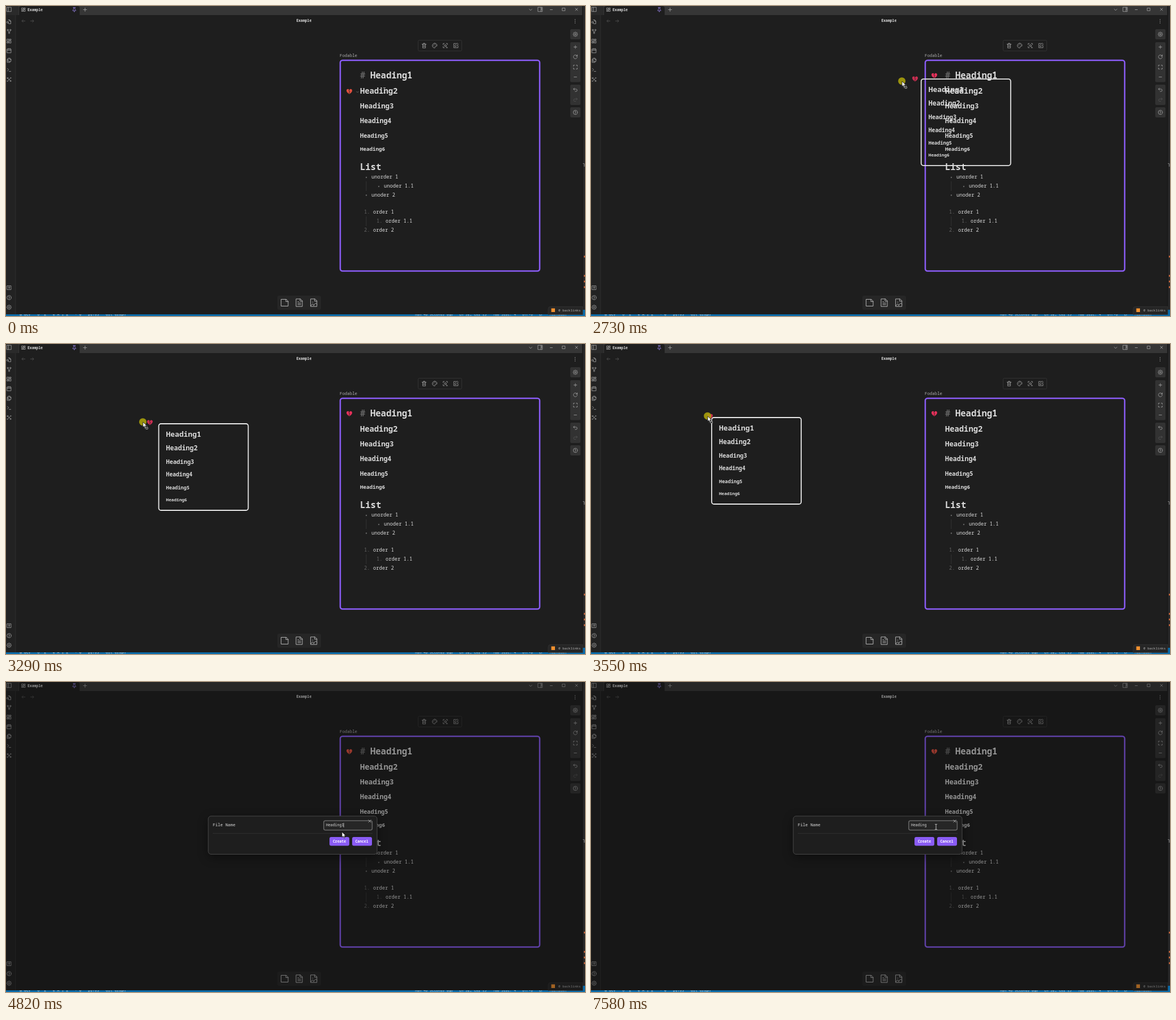
Animation, 1022 px wide and 548 px high, one loop 7990 ms. Source, as an HTML page with a canvas:

```html
<!DOCTYPE html>
<html lang="en">
<head>
<meta charset="utf-8">
<title>Canvas drag demo</title>
<style>
html, body { margin: 0; width: 100%; height: 100%; overflow: hidden; background: #1e1e1e; }
canvas { display: block; width: 1022px; height: 548px; }
</style>
</head>
<body>
<canvas id="stage" width="1022" height="548"></canvas>
<script>
const ctx = document.getElementById('stage').getContext('2d');
const LOOP = 7990, PRESS = 2460, DRAG = 2620, DROP = 3680;
const MONO = '"Noto Sans Mono", "DejaVu Sans Mono", monospace';
const BG = '#1e1e1e', PANEL = '#262626', ICON = '#a6a6a6', TEXT = '#dadada', PURPLE = '#8a5cf5';

// Outlines on a 24 unit grid
const ICONS = {
  panelLeft: 'M3 3H21V21H3Z M9 3V21',
  panelRight: 'M3 3H21V21H3Z M15 3V21 M18 7V9 M18 12V14',
  board: 'M3 3H10V12H3Z M14 3H21V8H14Z M14 12H21V21H14Z M3 16H10V21H3Z',
  pin: 'M12 17V23 M7 2H17 M9 2V10L5 14V17H19V14L15 10V2',
  plus: 'M12 4V20 M4 12H20',
  minus: 'M5 12H19',
  close: 'M5 5L19 19 M19 5L5 19',
  square: 'M4 4H20V20H4Z',
  down: 'M5 9L12 16L19 9',
  left: 'M20 12H4 M10 5L3 12L10 19',
  right: 'M4 12H20 M14 5L21 12L14 19',
  search: 'M8 3H15L20 8V21H11 M14 3V9H20 M9 14A4 4 0 1 1 1 14A4 4 0 1 1 9 14 M8 17L11 21',
  fork: 'M9 5A3 3 0 1 1 3 5A3 3 0 1 1 9 5 M21 5A3 3 0 1 1 15 5A3 3 0 1 1 21 5 M15 19A3 3 0 1 1 9 19A3 3 0 1 1 15 19 M6 8L11 16 M18 8L13 16',
  calendar: 'M3 4H21V22H3Z M3 10H21 M8 1V6 M16 1V6',
  copy: 'M8 2H16L21 7V17H8Z M15 2V8H21 M8 7H3V22H16V17',
  terminal: 'M4 17L10 11L4 5 M12 19H20',
  tools: 'M4 4L20 20 M20 4L4 20 M2 6L6 2 M18 2L22 6 M2 18L6 22 M18 22L22 18 M8 4L4 8 M16 20L20 16',
  vault: 'M3 3H21V21H3Z M15 10A3 3 0 1 1 9 10A3 3 0 1 1 15 10 M12 13V17',
  help: 'M22 12A10 10 0 1 1 2 12A10 10 0 1 1 22 12 M9 9A3 3 0 1 1 12 13V14 M12 17V18',
  trash: 'M3 6H21 M6 6V22H18V6 M9 6V2H15V6 M10 11V17 M14 11V17',
  palette: 'M12 2A10 10 0 1 0 12 22C15 22 12 18 14 16C17 14 22 17 22 11C22 6 17 2 12 2 M7 12V13 M9 7V8 M14 6V7 M18 10V11',
  zoom: 'M3 8V3H8 M16 3H21V8 M3 16V21H8 M16 21H21 M16 12A4 4 0 1 1 8 12A4 4 0 1 1 16 12 M15 15L20 20',
  edit: 'M12 3H3V21H21V12 M18 2L22 6L12 16H8V12Z',
  rotate: 'M21 12A9 9 0 1 1 18 5L21 8 M21 2V8H15',
  expand: 'M3 8V3H8 M16 3H21V8 M3 16V21H8 M16 21H21V16',
  undo: 'M8 4L3 9L8 14 M3 9H15A5 5 0 0 1 15 20H11',
  redo: 'M16 4L21 9L16 14 M21 9H9A5 5 0 0 0 9 20H13',
  note: 'M3 3H16L21 8V21H3Z M15 3V9H21',
  file: 'M4 2H15L20 7V22H4Z M14 2V8H20 M8 9H10 M8 13H16 M8 17H16',
  image: 'M4 2H15L20 7V22H4Z M14 2V8H20 M4 20L9 15L13 19 M10 20L17 13L20 16 M9 10V11'
};
for (const name in ICONS) ICONS[name] = new Path2D(ICONS[name]);

function icon(name, x, y, size = 9, color = ICON, weight = 0.8) {
  ctx.save();
  ctx.translate(x - size / 2, y - size / 2);
  ctx.scale(size / 24, size / 24);
  ctx.strokeStyle = color;
  ctx.lineWidth = weight * 24 / size;
  ctx.lineJoin = ctx.lineCap = 'round';
  ctx.stroke(ICONS[name]);
  ctx.restore();
}

function gear(x, y) {
  ctx.strokeStyle = ICON;
  ctx.lineWidth = 0.8;
  ctx.beginPath();
  for (let i = 0; i <= 64; i++) {
    const a = i / 64 * Math.PI * 2, r = 3.5 + 0.55 * Math.tanh(4 * Math.cos(8 * a));
    ctx.lineTo(x + r * Math.cos(a), y + r * Math.sin(a));
  }
  ctx.stroke();
  circle(x, y, 1.3);
  ctx.stroke();
}

function circle(x, y, r, fill) {
  ctx.beginPath();
  ctx.arc(x, y, r, 0, Math.PI * 2);
  if (fill) { ctx.fillStyle = fill; ctx.fill(); }
}

function rect(x, y, w, h, fill) {
  ctx.fillStyle = fill;
  ctx.fillRect(x, y, w, h);
}

function box(x, y, w, h, r, fill, stroke, line = 1) {
  ctx.beginPath();
  ctx.roundRect(x, y, w, h, r);
  if (fill) { ctx.fillStyle = fill; ctx.fill(); }
  if (stroke) { ctx.strokeStyle = stroke; ctx.lineWidth = line; ctx.stroke(); }
}

// y is the middle of the capitals
function text(str, x, y, size, color = TEXT, bold = false) {
  ctx.font = (bold ? 'bold ' : '') + size + 'px ' + MONO;
  ctx.fillStyle = color;
  ctx.fillText(str, x, y + size * 0.36);
}

function heart(x, y, color) {
  ctx.save();
  ctx.translate(x, y);
  ctx.fillStyle = color;
  ctx.beginPath();
  ctx.moveTo(0, 4.8);
  ctx.bezierCurveTo(-3, 2.6, -5, 0.8, -5, -1.6);
  ctx.bezierCurveTo(-5, -5, -1, -5, 0, -2.4);
  ctx.bezierCurveTo(1, -5, 5, -5, 5, -1.6);
  ctx.bezierCurveTo(5, 0.8, 3, 2.6, 0, 4.8);
  ctx.fill();
  ctx.strokeStyle = BG;
  ctx.lineWidth = 0.9;
  ctx.stroke(new Path2D('M.3 -3.4L-.9 -1.2L1 .2L-.4 2L.2 4'));
  ctx.restore();
}

const arrowPath = new Path2D('M0 0V9.4L2.2 7.4L3.8 10.8L5.4 10.1L3.9 6.8H6.8Z');
function arrow(x, y) {
  ctx.save();
  ctx.translate(x, y);
  ctx.lineWidth = 0.8;
  ctx.strokeStyle = '#111';
  ctx.fillStyle = '#fff';
  ctx.fill(arrowPath);
  ctx.stroke(arrowPath);
  ctx.restore();
}

function beam(x, y) {
  ctx.save();
  ctx.translate(x, y);
  ctx.strokeStyle = '#d0d0d0';
  ctx.lineWidth = 0.9;
  ctx.stroke(new Path2D('M-2 -4.5H-.5L0 -4L.5 -4.5H2 M0 -4V4 M-2 4.5H-.5L0 4L.5 4.5H2'));
  ctx.restore();
}

// [time, x, y, eased]
const MOUSE = [
  [30, 668, 149], [820, 662, 279, 1], [860, 662, 279], [1630, 635, 120, 1], [1660, 635, 120],
  [1970, 612, 117, 1], [2170, 603.5, 122.5, 1], [2590, 603.5, 122.5], [2680, 576, 126.5],
  [2710, 569, 128], [2730, 549.5, 133], [3240, 263, 138.5], [3290, 242, 138],
  [3410, 213, 130], [3500, 206, 127.5], [4180, 206, 127.5], [4820, 593, 265, 1],
  [5030, 598.5, 276.5], [6040, 598.5, 276.5], [6620, 609, 256, 1]
];
function mouseAt(t) {
  const i = MOUSE.findIndex(k => k[0] > t);
  if (i === 0) return MOUSE[0].slice(1, 3);
  if (i < 0) return MOUSE[MOUSE.length - 1].slice(1, 3);
  const [t0, x0, y0] = MOUSE[i - 1], [t1, x1, y1, eased] = MOUSE[i];
  let u = (t - t0) / (t1 - t0);
  if (eased) u = u * u * (3 - 2 * u);
  return [x0 + (x1 - x0) * u, y0 + (y1 - y0) * u];
}

function backdrop() {
  rect(0, 0, 1022, 548, '#252526');
  rect(0, 543, 1018, 5, '#0a6aa8');
  rect(1018, 537, 4, 11, '#0a6aa8');
  text('n', 1016, 280, 10, '#999');
  for (const y of [443, 477, 487, 497]) rect(1020, y - 1.5, 2, 3, '#d0683a');
  text('& dev   o  2   0 A 1 2   + 0   py/os   Git Graph', 24, 545, 6.5, '#cfe3f0');
  text('Run 48 seconds ago   Ln 32, Col 13   Tab Size: 4   UTF-8   LF   Markdown', 722, 545, 6.2, '#cfe3f0');
}

function chrome() {
  rect(0, 0, 1018, 545, BG);
  rect(0, 0, 1018, 16, '#363636');
  rect(0, 0, 22, 16, '#2a2a2a');
  box(23, 0, 107, 17, [4, 4, 0, 0], BG);
  rect(0, 16, 17, 529, '#222');
  rect(16.5, 16, 0.8, 529, '#343434');
  rect(1017, 0, 1, 545, '#151515');

  icon('panelLeft', 5.5, 6, 10);
  icon('board', 31, 6.5, 8);
  text('Example', 38, 6.5, 6.4, TEXT, true);
  icon('pin', 120.5, 6.5, 9, '#9a86ee');
  icon('plus', 139.5, 6.5);
  icon('down', 926, 6.5, 8);
  icon('panelRight', 943, 6, 10);
  icon('minus', 962.5, 6.5, 7);
  icon('square', 984.5, 6, 7);
  icon('close', 1007, 6, 7);
  icon('left', 31, 26.5, 8, '#555');
  icon('right', 46, 26.5, 8, '#555');
  text('Example', 512.4, 25.5, 6.4, TEXT, true);
  for (const y of [24, 27, 30]) circle(1004.5, y, 0.7, ICON);

  ['search', 'fork', 'board', 'calendar', 'copy', 'terminal', 'tools']
    .forEach((name, i) => icon(name, 5.5, 28 + i * 17));
  icon('vault', 5.5, 498);
  icon('help', 5.5, 515.5);
  gear(5.5, 532.5);
}

function controls() {
  for (const [y, h] of [[41, 18], [64, 70.5], [139, 36], [179, 18]]) box(996, y, 18, h, 2, '#323232');
  gear(1005, 50);
  icon('plus', 1005, 72.5, 8);
  icon('rotate', 1005, 90);
  icon('expand', 1005, 108);
  icon('minus', 1005, 125.5, 8);
  icon('undo', 1005, 148);
  icon('redo', 1005, 165.5, 9, '#555');
  icon('help', 1005, 188);

  box(727.5, 60.5, 77, 19, 2, BG, '#323232');
  ['trash', 'palette', 'zoom', 'edit'].forEach((name, i) => icon(name, 738 + i * 18.7, 70, 10));

  box(479, 512, 77, 25, 3, PANEL);
  ['note', 'file', 'image'].forEach((name, i) => icon(name, 492 + i * 25.7, 524.5, 16, '#b3b3b3', 1));

  box(957, 531.5, 61, 14, [4, 0, 0, 0], PANEL, '#363636', 0.7);
  rect(962.5, 534.5, 6.5, 6.5, '#f0902f');
  text('0 backlinks', 975, 538, 5.95, '#b3b3b3');
}

const ROWS = [122, 150, 177, 203, 229, 252.5, 284];
const SIZES = [15.5, 13.8, 12.4, 11.5, 10.3, 9.2];
function card() {
  text('Fodable', 589, 87.5, 7.4, '#adadad');
  box(590, 96, 352, 372.5, 4, BG, PURPLE, 2.5);
  text('#', 625, ROWS[0], 15.5, '#666', true);
  SIZES.forEach((size, i) => text('Heading' + (i + 1), i ? 625 : 643, ROWS[i], size, TEXT, true));
  text('List', 625, ROWS[6], 15.5, TEXT, true);

  const items = [['unorder 1', 645, 302], ['unoder 1.1', 667, 318], ['unoder 2', 645, 333.5],
    ['order 1', 648, 364], ['order 1.1', 670, 380], ['order 2', 648, 395.5]];
  items.forEach(([label, x, y], i) => {
    text(label, x, y, 8.75);
    if (i < 3) circle(x - 9, y + 1, 1.2, '#666');
    else text(i === 5 ? '2.' : '1.', x - 16, y, 8.75, '#666');
  });
  rect(635.5, 310, 0.8, 17, '#3a3a3a');
  rect(635.5, 372, 0.8, 17, '#3a3a3a');
}

const GHOST = [[19, 12.9], [44, 11.6], [68, 10.3], [91, 9.7], [114, 8.6], [135, 7.7]];
function ghost(x, y) {
  box(x + 1, y + 1, 158, 153, 4, null, '#e6e6e6', 1.8);
  GHOST.forEach(([dy, size], i) => text('Heading' + (i + 1), x + 14, y + dy, size, TEXT, true));
}

function modal(t, hover) {
  ctx.save();
  ctx.shadowColor = 'rgba(0,0,0,0.45)';
  ctx.shadowBlur = 18;
  ctx.shadowOffsetY = 5;
  box(357, 237, 298, 67.5, 5, BG);
  ctx.restore();
  box(357, 237, 298, 67.5, 5, null, '#484848');
  text('File Name', 365, 252.5, 7.4);
  rect(365, 267.3, 282, 0.8, '#363636');
  box(560.8, 245.3, 85.6, 16.4, 3, '#262626', '#666', 1.5);
  text(t < 7580 ? 'Heading1' : 'Heading', 565, 253, 6.5);
  icon('close', 642, 246, 7.5, '#b3b3b3');
  box(571, 274, 35, 15.5, 3, hover ? '#a68af9' : PURPLE);
  box(611, 274, 35, 15.5, 3, PURPLE);
  text('Create', 577, 281.5, 6.4, '#fff', true);
  text('Cancel', 616.5, 281.5, 6.4, '#fff', true);

  const blinks = [4290, 4810, 5330, 5890, 6410, 6930, 7440].filter(b => t >= b).length;
  if (blinks % 2 === 0) rect(595.6, 249, 0.8, 8, TEXT);
}

function draw(t) {
  const [mx, my] = mouseAt(t);
  ctx.clearRect(0, 0, 1022, 548);
  backdrop();
  chrome();
  card();
  controls();

  const gap = y => Math.abs(y - my);
  const row = t < 1630 ? ROWS.reduce((best, y, i) => gap(y) < gap(ROWS[best]) ? i : best, 0) : 0;
  const red = t > 860 && t < DROP ? '#e8315b' : '#e2503f';
  heart(606, ROWS[row] + 1, red);
  if (row) icon('down', 620.5, ROWS[row] + 2, 6, '#777');

  const dragging = t >= DRAG && t < DROP;
  if (dragging) {
    const [gx, gy] = mouseAt(t - 50), [hx, hy] = mouseAt(t - 20);
    ghost(gx + 6, gy + 1.5);
    ctx.globalAlpha = 0.85;
    heart(hx + 4, hy + 0.5, red);
    ctx.globalAlpha = 1;
  }

  const fade = Math.max(0, Math.min(1, (t - 3760) / 240));
  if (fade) {
    rect(0, 0, 1018, 545, `rgba(10,10,10,${0.34 * fade})`);
    ctx.globalAlpha = fade;
    modal(t, my > 273.5 && mx > 571);
    ctx.globalAlpha = 1;
  }

  if (t >= PRESS && t < DROP) circle(mx - 0.3, my - 0.3, 6.5, 'rgba(178,168,10,0.85)');
  const overText = (t < 2000 && mx > 622) || (t > 6040 && my < 262);
  if (overText) beam(mx, my);
  else arrow(mx, my);
  if (dragging) {
    ctx.setLineDash([1, 1]);
    box(mx + 2.5, my + 6.5, 5, 5, 0, null, '#888', 0.7);
    ctx.setLineDash([]);
    box(mx + 5.2, my + 9.3, 3.3, 3.3, 0.5, '#222', '#ccc', 0.8);
  }
}

function tick() {
  draw(performance.now() % LOOP);
  requestAnimationFrame(tick);
}
tick();
</script>
</body>
</html>
```
